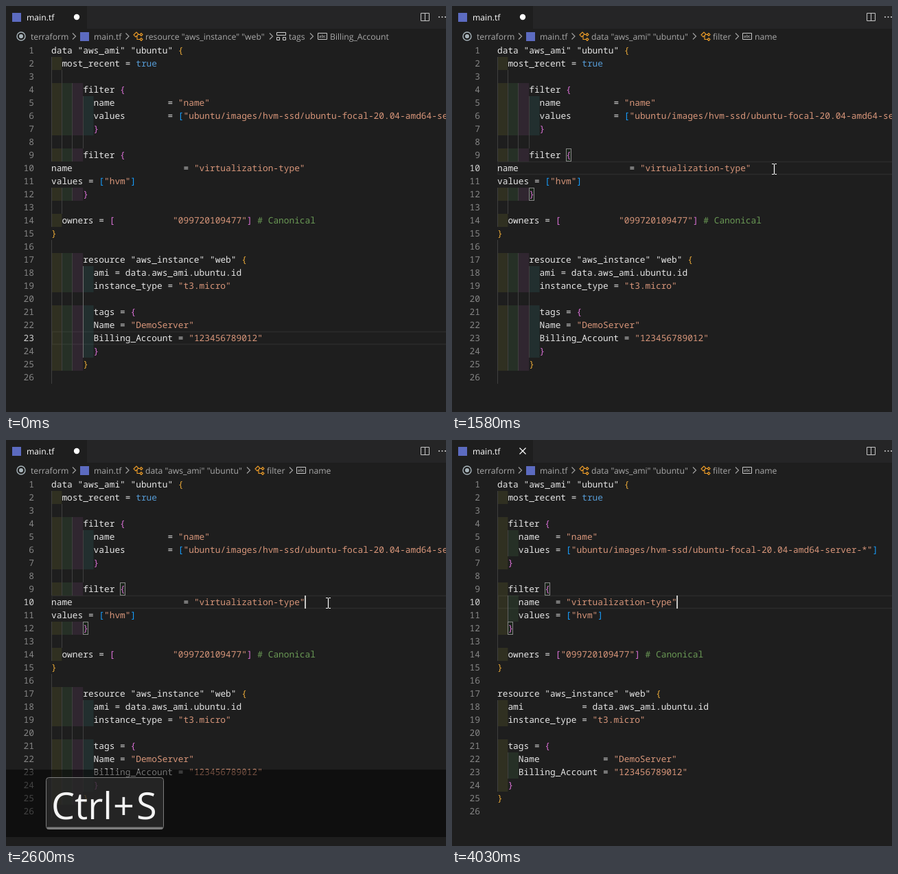
Recreate the animation shown at these times as an HTML page. Size 641x590 px, loop 4.16 s.

```html
<!DOCTYPE html>
<html lang="en">
<head>
<meta charset="utf-8">
<title>main.tf</title>
<style>
html, body { margin: 0; width: 100%; height: 100%; overflow: hidden; background: #1e1e1e; }
svg { display: block; width: 100vw; height: 100vh; }
.code { font: 12.83px "Noto Sans Mono", "DejaVu Sans Mono", monospace; }
.ui { font: 12.2px "Open Sans", "Noto Sans", sans-serif; fill: #a9a9a9; }
.key { font: 54px "Open Sans", "Noto Sans", sans-serif; fill: #f4f4f4; }
.line { fill: none; }
</style>
</head>
<body>
<svg id="stage" viewBox="0 0 641 590" text-rendering="geometricPrecision"></svg>
<script>
const LOOP = 4160, LEFT = 66, CHAR = 7.7, ROW = 19, TOP = 55;
const stage = document.getElementById('stage');
const colX = c => LEFT + c * CHAR;
const rowY = n => TOP + (n - 1) * ROW;

function add(parent, tag, attrs = {}, text) {
  const el = document.createElementNS('http://www.w3.org/2000/svg', tag);
  for (const k in attrs) el.setAttribute(k, attrs[k]);
  if (text !== undefined) el.textContent = text;
  parent.appendChild(el);
  return el;
}
const group = (parent = stage, attrs) => add(parent, 'g', attrs);
const box = (p, x, y, width, height, fill, more) => add(p, 'rect', { x, y, width, height, fill, ...more });
const stroke = (p, d, color, width = 1) =>
  add(p, 'path', { d, class: 'line', stroke: color, 'stroke-width': width });
const show = (el, on) => el.setAttribute('display', on ? 'inline' : 'none');

// Code before and after formatting; a number n in <n> stands for n spaces.
const spaces = s => s.replace(/<(\d+)>/g, (_, n) => ' '.repeat(n)).split('\n');
const messy = spaces(`data "aws_ami" "ubuntu" {
<2>most_recent = true

<6>filter {
<8>name<10>= "name"
<8>values<8>= ["ubuntu/images/hvm-ssd/ubuntu-focal-20.04-amd64-server-*"]
<8>}

<6>filter {
name<21>= "virtualization-type"
values = ["hvm"]
<6>}

<2>owners = [<11>"099720109477"] # Canonical
}

<6>resource "aws_instance" "web" {
<8>ami = data.aws_ami.ubuntu.id
<8>instance_type = "t3.micro"

<8>tags = {
<8>Name = "DemoServer"
<8>Billing_Account = "123456789012"
<8>}
<6>}
`);
const tidy = spaces(`data "aws_ami" "ubuntu" {
<2>most_recent = true

<2>filter {
<4>name<3>= "name"
<4>values = ["ubuntu/images/hvm-ssd/ubuntu-focal-20.04-amd64-server-*"]
<2>}

<2>filter {
<4>name<3>= "virtualization-type"
<4>values = ["hvm"]
<2>}

<2>owners = ["099720109477"] # Canonical
}

resource "aws_instance" "web" {
<2>ami<11>= data.aws_ami.ubuntu.id
<2>instance_type = "t3.micro"

<2>tags = {
<4>Name<12>= "DemoServer"
<4>Billing_Account = "123456789012"
<2>}
}
`);

const indent = s => s.search(/\S/);
const PAIRS = ['#e8a838', '#da70d6', '#179fff'];
const BANDS = ['rgb(255,255,64)', 'rgb(127,255,127)', 'rgb(255,127,255)', 'rgb(79,236,236)'];

function drawText(p, lines) {
  let depth = 0;
  lines.forEach((s, i) => {
    const header = /^\s*(data|resource) "/.test(s);
    for (const m of s.matchAll(/#.*|"[^"]*"|[{}\[\]]|[^\s"{}\[\]]+/g)) {
      const t = m[0];
      let fill = '#e6e6e6';
      if (t[0] === '#') fill = '#6a9955';
      else if (t[0] === '"' && !header) fill = '#d8967a';
      else if (t === 'true') fill = '#569cd6';
      else if (/[{\[]/.test(t[0])) fill = PAIRS[depth++];
      else if (/[}\]]/.test(t[0])) fill = PAIRS[--depth];
      add(p, 'text', { x: colX(m.index), y: rowY(i + 1) + 14, fill }, t);
    }
  });
}

function drawGuides(p, lines) {
  const level = lines.map(s => s ? indent(s) / 2 : -1);
  lines.forEach((s, i) => {
    let n = level[i];
    if (n < 0) {
      const a = level[i - 1], b = level[i + 1] ?? 0;
      n = a < b ? a + 1 : a === b ? b : b + 1;
    }
    for (let k = 0; k < n; k++)
      box(p, Math.floor(colX(2 * k)), rowY(i + 1), 1, ROW, '#404040');
  });
}

const band = (p, row, from, to, k) =>
  box(p, colX(from), rowY(row), (to - from) * CHAR, ROW, BANDS[k], { 'fill-opacity': 0.08 });

function drawBands(p, lines) {
  lines.forEach((s, i) => {
    for (let k = 0; k < indent(s) / 2; k++) band(p, i + 1, 2 * k, 2 * k + 2, k);
  });
}

function drawMatch(p, openCol, closeCol) {
  [[9, openCol], [12, closeCol]].forEach(([row, c]) =>
    box(p, Math.floor(colX(c)) + 0.5, rowY(row) + 0.5, 7, 18, 'rgba(0,100,0,.1)', { stroke: '#888' }));
}

// Window
box(stage, 0, 0, 641, 590, '#1e1e1e');
box(stage, 118, 0, 523, 33, '#252526');
const logo = (x, y) => box(stage, x, y, 13, 13, '#5c6bc0');
logo(9, 10);
logo(108, 38);
const label = (p, x, y, t, fill = '#a9a9a9') => add(p, 'text', { x, y, class: 'ui', style: `fill:${fill}` }, t);
label(stage, 30, 21, 'main.tf', '#fff');
const dot = add(stage, 'circle', { cx: 103, cy: 16, r: 4.2, fill: '#fff' });
const cross = stroke(stage, 'M98.5 11.5l9 9m0-9l-9 9', '#fff', 1.2);
stroke(stage, 'M604.5 10.5h12v11h-12zM610.5 10.5v11', '#c5c5c5');
[631, 635.5, 640].forEach(cx => add(stage, 'circle', { cx, cy: 16, r: 1.1, fill: '#c5c5c5' }));

// Breadcrumbs
const chevron = (p, x) => stroke(p, `M${x} 39.5l4.5 4.5l-4.5 4.5`, '#a0a0a0', 1.2);
const blockIcon = (p, x) =>
  stroke(p, `M${x} 42l4-4l3 3l-4 4zM${x + 6} 41.5h4M${x + 5} 43v5.5h5M${x + 9} 41.5l2-2l2 2l-2 2zM${x + 9} 48.5l2-2l2 2l-2 2z`, '#ee9d28', 1.1);
const structIcon = (p, x) =>
  stroke(p, `M${x + .5} 38.5h13v4h-13zM${x + .5} 45.5h4v4h-4zM${x + 9.5} 45.5h4v4h-4z`, '#d0d0d0');
function stringIcon(p, x) {
  stroke(p, `M${x + .5} 39.5h13v9h-13z`, '#c8c8c8');
  add(p, 'text', { x: x + 7, y: 46, class: 'ui', 'text-anchor': 'middle', style: 'font-size:6px;fill:#d8d8d8' }, 'abc');
}
add(stage, 'circle', { cx: 22, cy: 44, r: 6, class: 'line', stroke: '#a8b4ba', 'stroke-width': 1.4 });
add(stage, 'circle', { cx: 22, cy: 44, r: 3, fill: '#a8b4ba' });
label(stage, 36, 49, 'terraform');
chevron(stage, 97);
label(stage, 128, 49, 'main.tf');
chevron(stage, 174.5);
blockIcon(stage, 186);
const crumbTags = group(), crumbName = group();
label(crumbTags, 203, 49, 'resource "aws_instance" "web"');
chevron(crumbTags, 384);
structIcon(crumbTags, 394);
label(crumbTags, 412, 49, 'tags');
chevron(crumbTags, 443);
stringIcon(crumbTags, 454);
label(crumbTags, 472, 49, 'Billing_Account');
label(crumbName, 203, 49, 'data "aws_ami" "ubuntu"');
chevron(crumbName, 351);
blockIcon(crumbName, 363);
label(crumbName, 380, 49, 'filter');
chevron(crumbName, 413);
stringIcon(crumbName, 423);
label(crumbName, 441, 49, 'name');

// Editor
const current = box(stage, LEFT + 1, 0, 600, ROW - 1, 'none', { stroke: '#2b2b2b', 'stroke-width': 1.6 });
const numbers = messy.map((_, i) =>
  add(stage, 'text', { x: 41, y: rowY(i + 1) + 14, class: 'code', 'text-anchor': 'end' }, i + 1));

const before = group(stage, { class: 'code' }), after = group(stage, { class: 'code' });
drawBands(before, messy);
drawGuides(before, messy);
const tagsGuide = box(before, Math.floor(colX(6)), rowY(18), 1, 7 * ROW, '#707070');
const matchBefore = group(before);
drawMatch(matchBefore, 13, 6);
drawText(before, messy);

const settled = group(after), shifted = group(after);
drawBands(settled, tidy);
// Indent colours carried along by the edit until they are recomputed: [from, to, colour] by row.
const leftover = {
  2: [[0, 2, 0]], 4: [[0, 2, 0]], 5: [[0, 2, 2], [2, 4, 3]],
  7: [[0, 2, 3]], 9: [[0, 2, 0]], 12: [[0, 2, 2]], 14: [[0, 2, 0]],
  18: [[5, 7, 0], [7, 9, 1], [9, 11, 2], [11, 13, 3]], 19: [[0, 2, 3]], 21: [[0, 2, 0]],
  22: [[4, 8, 1], [8, 10, 2], [10, 19, 3]], 23: [[0, 2, 2], [2, 4, 3]], 24: [[0, 2, 3]]
};
for (const row in leftover) leftover[row].forEach(b => band(shifted, +row, ...b));
drawGuides(after, tidy);
box(after, Math.floor(colX(2)), rowY(10), 1, 2 * ROW, '#606060');
drawMatch(after, 9, 2);
drawText(after, tidy);

const caret = box(stage, 0, rowY(10), 2, ROW, '#c8c8c6');
const mouse = group();
stroke(mouse, 'M-3.5 -7.5h3M.5 -7.5h3M0 -7v14M-3.5 7.5h3M.5 7.5h3', '#fff', 1.2);

// Pressed keys
const overlay = group();
box(overlay, 0, 479, 641, 98, '#000', { 'fill-opacity': 0.5 });
function keycap(x, width) {
  const g = group(overlay);
  box(g, x + .5, 490.5, width - 1, 75, '#333', { rx: 4, 'fill-opacity': 0.6, stroke: '#7c7c7c' });
  stroke(g, `M${x + 2} 564h${width - 4}`, '#7c7c7c', 3);
  add(g, 'text', { x: x + 8, y: 551, class: 'key' }, 'Ctrl');
  return g;
}
const ctrl = keycap(92, 104), ctrlS = keycap(58, 172);
add(ctrlS, 'text', { x: 156, y: 551, class: 'key' }, '+');
add(ctrlS, 'text', { x: 190, y: 551, class: 'key' }, 'S');

const ticks = [0];
for (let t = 200; t <= 830; t += 70) ticks.push(t);
ticks.push(970, 1040, 1120, 1250, 1580, 1910, 1980, 2050, 2110, 2180, 2600, 2710, 2840,
  3180, 3370, 3700, 3900, 3970, 4030);

function mouseAt(t) {
  if (t < 200 || t >= 4030) return null;
  if (t >= 3970) return [627.5, 525];
  if (t >= 3900) return [520, 330];
  const rest = 1 - Math.min(1, (t - 200) / 630);
  return [469.5 + 108 * rest ** 1.38, 237 + 351 * rest ** 1.87];
}

function draw(time) {
  const t = ticks.filter(k => k <= time).pop();
  const within = (a, b) => t >= a && t < b;
  const clicked = t >= 970, saved = t >= 2710;

  show(dot, !saved);
  show(cross, saved);
  show(crumbTags, t < 1250);
  show(crumbName, t >= 1250);

  const row = clicked ? 10 : 23;
  current.setAttribute('y', rowY(row) + 0.5);
  numbers.forEach((el, i) => el.setAttribute('fill', i + 1 === row ? '#d0d0d0' : '#858585'));

  show(before, !saved);
  show(after, saved);
  show(tagsGuide, !clicked);
  show(matchBefore, t >= 1040);
  show(shifted, t < 2840);
  show(settled, t >= 2840);

  show(caret, within(970, 1580) || within(2110, 3180) || t >= 3700);
  caret.setAttribute('x', Math.floor(colX(saved ? 34 : 48)));

  const pos = mouseAt(t);
  show(mouse, pos);
  if (pos) mouse.setAttribute('transform', `translate(${pos})`);

  show(overlay, within(1910, 3370));
  overlay.setAttribute('opacity', Math.min(1, 0.3 + 0.7 * Math.max(0, t - 1910) / 270));
  show(ctrl, t < 2600);
  show(ctrlS, t >= 2600);
}

const start = performance.now();
function frame() {
  draw((performance.now() - start) % LOOP);
  requestAnimationFrame(frame);
}
frame();
</script>
</body>
</html>
```
